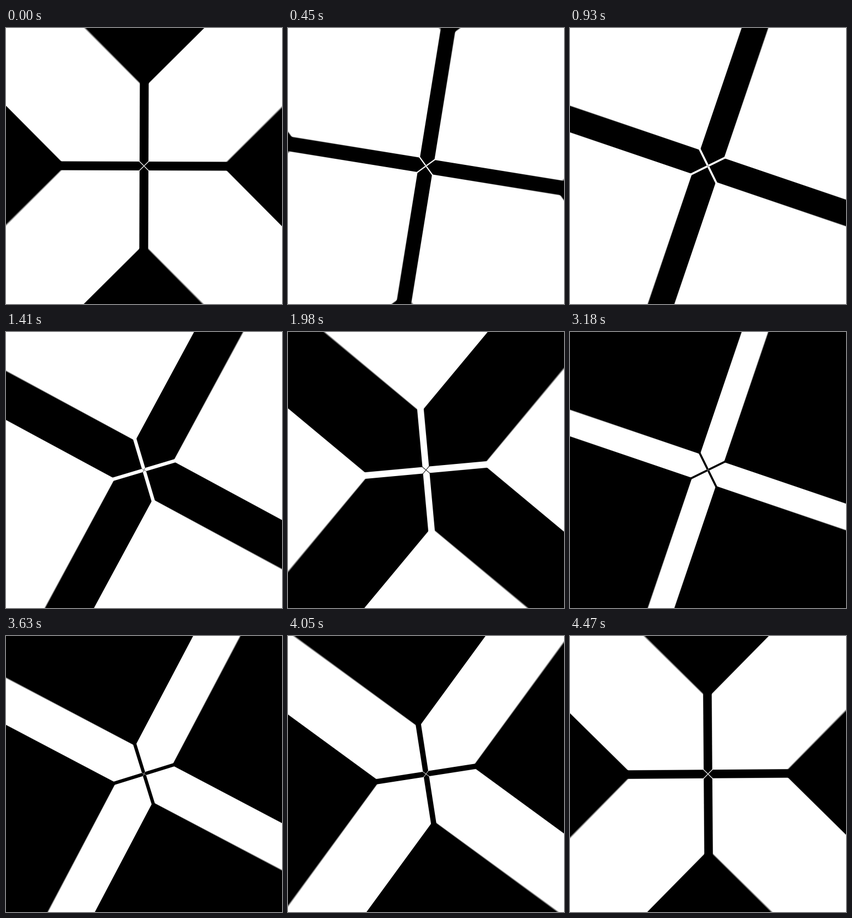
An HTML page with a canvas for the animation above (4.5 s loop, 500x500 px).

```html
<!DOCTYPE html>
<html lang="en">
<head>
<meta charset="utf-8">
<title>Endless crosses</title>
<style>
  html, body { margin: 0; width: 100%; height: 100%; overflow: hidden; background: #000; }
  canvas { display: block; width: 500px; height: 500px; }
</style>
</head>
<body>
<canvas id="stage" width="500" height="500"></canvas>
<script>
const SIZE = 500;
const LOOP = 4500;
const STEP = 30;
const BASE = 15.9;    // cross width at the start of the loop
const RATIO = 12.5;   // width ratio of neighbouring crosses
const SHUTTER = 0.6;  // part of a step covered by motion blur
const SAMPLES = 8;

const stage = document.getElementById('stage').getContext('2d');
const buffer = document.createElement('canvas');
buffer.width = buffer.height = SIZE;
const pen = buffer.getContext('2d');

function cross(width, angle, color) {
  const reach = SIZE * 6;
  pen.save();
  pen.translate(SIZE / 2, SIZE / 2);
  pen.rotate(angle);
  pen.fillStyle = color;
  pen.fillRect(-reach / 2, -width / 2, reach, width);
  pen.fillRect(-width / 2, -reach / 2, width, reach);
  pen.restore();
}

// Nested crosses, each an eighth of a turn from the next; two levels per loop.
function drawScene(time) {
  const phase = time / (LOOP / 2);
  pen.fillStyle = '#000';
  pen.fillRect(0, 0, SIZE, SIZE);
  for (let level = -2; level <= 4; level++) {
    const depth = phase - level;
    cross(BASE * RATIO ** depth, depth * Math.PI / 4, level % 2 ? '#fff' : '#000');
  }
}

function render(time) {
  for (let i = 0; i < SAMPLES; i++) {
    drawScene(time + STEP * SHUTTER * (i + 0.5) / SAMPLES);
    stage.globalAlpha = 1 / (i + 1);
    stage.drawImage(buffer, 0, 0);
  }
}

const start = performance.now();
let shown = -1;

function tick() {
  const elapsed = (performance.now() - start) % LOOP;
  const time = Math.floor(elapsed / STEP) * STEP;
  if (time !== shown) {
    shown = time;
    render(time);
  }
  requestAnimationFrame(tick);
}

tick();
</script>
</body>
</html>
```
